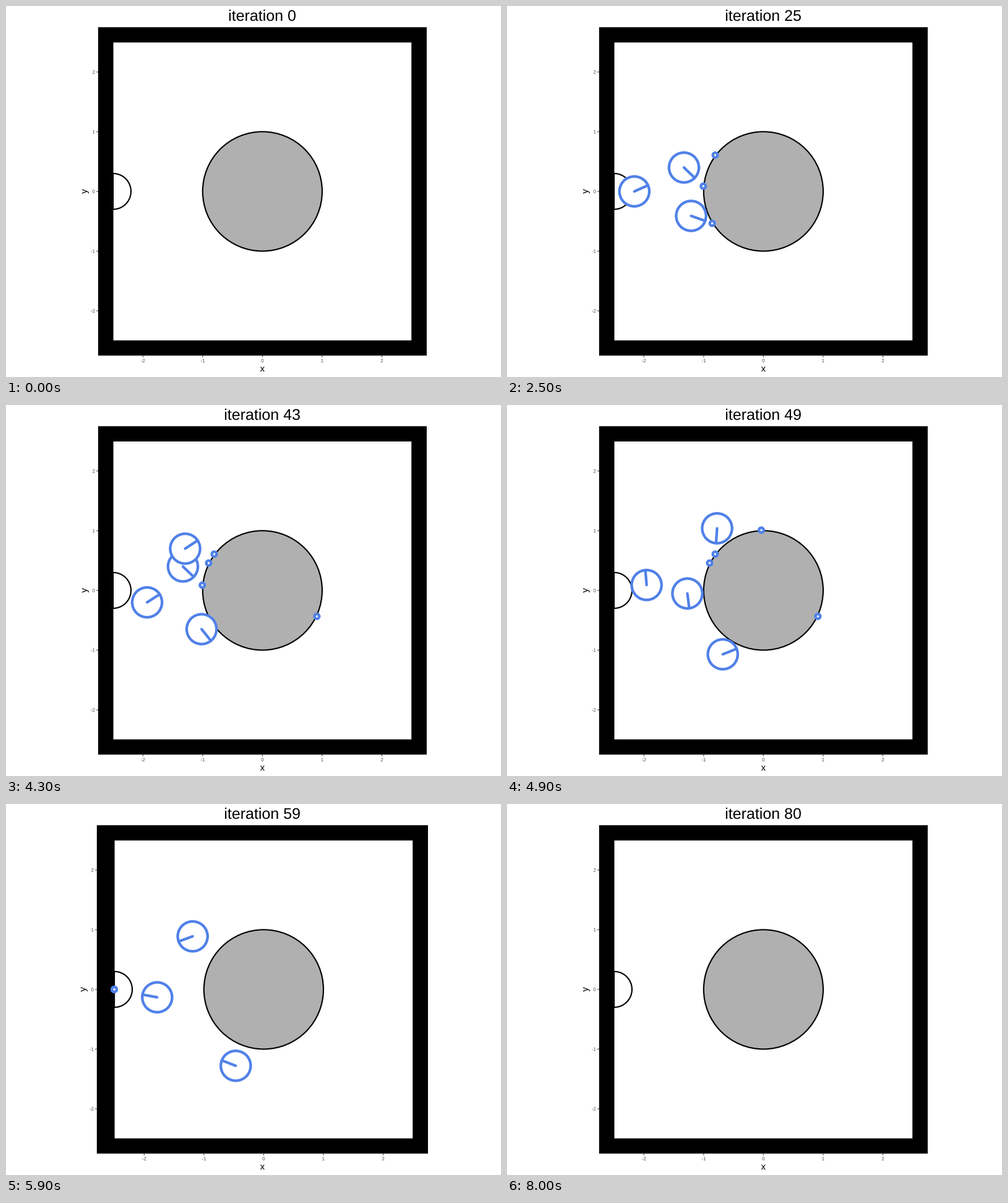
A matplotlib script for the animation above (8100 ms loop, 800x600 px).

```python
from itertools import pairwise

import numpy as np
import matplotlib.pyplot as plt
from matplotlib.animation import FuncAnimation
from matplotlib.patches import Circle, PathPatch, Polygon, Rectangle
from matplotlib.path import Path
from matplotlib.textpath import TextPath

plt.rcParams["font.family"] = "Liberation Sans"

FRAMES, INTERVAL = 81, 100
PX = 0.72                            # points per pixel at 100 dpi
TOP, BOTTOM = 34.3, 565.4            # panel edges in pixels
UNIT = (BOTTOM - TOP) / 5.5          # pixels per arena unit
CX, CY = 414.4, (TOP + BOTTOM) / 2
WALL, NEST, BODY, MARK = 2.5, 0.3, 0.25, 0.04
SPEED = 0.09                         # arena units per step
THIN, MEDIUM, THICK = 1.07, 2.13, 4.27
BLUE, GREY = "#5081e8", "#b0b0b0"
HOME = np.array([-WALL, 0.0])


def on_disc(degrees):
    a = np.radians(degrees)
    return 1.01 * np.array([np.cos(a), np.sin(a)])


def plan(stops, end):
    """Legs (depart, arrive, start, goal, mark) through the stops and back home.

    A stop is (arrival step, x, y, mark). Robots wait as long as SPEED allows.
    """
    last = np.array(stops[-1][1:3])
    door = HOME + (NEST + BODY) * (last - HOME) / np.hypot(*(last - HOME))
    legs = []
    for (t0, x0, y0, _), (t1, x1, y1, mark) in pairwise(stops + [(end, *door, HOME)]):
        start, goal = np.array([x0, y0]), np.array([x1, y1])
        depart = max(t0, t1 - np.hypot(*(goal - start)) / SPEED)
        legs.append((depart, t1, start, goal, mark))
    return stops[0][0], end, legs


ROBOTS = [
    plan([(1, -2.1, 0, None), (10, -1.33, -0.156, on_disc(197)),
          (22, -1.21, -0.41, on_disc(212)), (49, -0.68, -1.07, on_disc(-25.5)),
          (51, -0.18, -1.39, on_disc(-25.5)), (66, -1.055, -1.052, HOME)], end=80),
    plan([(13, -1.97, 0.07, None), (21, -1.33, 0.4, on_disc(175)),
          (51, -1.25, -0.23, on_disc(92))], end=61),
    plan([(25, -2.16, 0, None), (28, -2.04, -0.19, on_disc(143)),
          (37, -1.915, 0.29, on_disc(143)), (48, -0.775, 1.04, on_disc(143)),
          (66, -1.78, 0.672, HOME)], end=71),
    plan([(41, -1.93, -0.2, None), (51, -1.97, 0.27, on_disc(153))], end=54.4),
]


def pose(legs, step):
    """Position, unit heading and mark; a resting robot faces its mark."""
    started = [leg for leg in legs if leg[0] <= step]
    depart, arrive, start, goal, mark = (started or legs)[-1 if started else 0]
    pos = start + (goal - start) * np.clip((step - depart) / (arrive - depart), 0, 1)
    look = goal - start if depart < step <= arrive else mark - pos
    return pos, look / np.hypot(*look), mark


fig = plt.figure(figsize=(8, 6), dpi=100, facecolor="white")
ax = fig.add_axes([0, 0, 1, 1])


def pixels(point, shift):
    return np.array([CX + shift, CY]) + UNIT * np.asarray(point) * [1, -1]


def stroke(points, width, color, cap="butt"):
    ax.plot(*np.transpose(points), color=color, lw=width * PX,
            solid_capstyle=cap, snap=False)


def disc(center, radius, width, edge, fill):
    ax.add_patch(Circle(center, radius * UNIT, fc=fill, ec=edge, lw=width * PX))


def box(x0, y0, x1, y1, fill, width=0):
    ax.add_patch(Rectangle((x0, y0), x1 - x0, y1 - y0, fc=fill, ec="black",
                           lw=width * PX, snap=False))


def label(x, y, text, size, color="black", align=0.5, upright=False):
    """Text on a baseline through (x, y); align 0 is left, 1 is right."""
    path = TextPath((0, 0), text, size=size)
    ink = path.get_extents()
    u, v = path.vertices.T
    u = u - ink.x0 - align * ink.width
    points = (x - v, y - u) if upright else (x + u, y - v)
    ax.add_patch(PathPatch(Path(np.column_stack(points), path.codes),
                           fc=color, ec="none", snap=False))


def draw_arena(shift):
    half = (BOTTOM - TOP) / 2 + shift
    left, right = CX - half, CX + half
    box(left, TOP, right, BOTTOM, "black")
    box(*pixels((-WALL, WALL), shift), *pixels((WALL, -WALL), shift), "white", THIN)
    for v in range(-2, 3):
        x, y = pixels((v, v), shift)
        stroke([(x, BOTTOM), (x, BOTTOM + 2.75)], THIN, "#333333")
        stroke([(left - 2.75, y), (left, y)], THIN, "#333333")
        label(x, 576.3, f"{v}", 8, "#4d4d4d")
        label(left - 5.3, y + 2.87, f"{v}", 8, "#4d4d4d", align=1)
    label(CX, 591.3, "x", 15)
    label(130.8 - shift, CY, "y", 15, upright=True)

    disc(pixels((0, 0), shift), 1, MEDIUM, "black", GREY)
    a = np.linspace(-np.pi / 2, np.pi / 2, 80)
    arc = HOME + NEST * np.column_stack([np.cos(a), np.sin(a)])
    ax.add_patch(Polygon(pixels(arc, shift), fc="white", ec="black", lw=MEDIUM * PX))


def update(step):
    ax.clear()
    ax.set(xlim=(0, 800), ylim=(600, 0))
    ax.axis("off")
    poses = [pose(legs, step) for birth, end, legs in ROBOTS if birth <= step < end]
    # A mark on the wall widens the x range by its radius plus 5 % padding.
    wide = any(mark is HOME for _, _, mark in poses)
    shift = 1.05 * MARK * UNIT / 2 if wide else 0
    draw_arena(shift)
    for pos, look, _ in poses:
        disc(pixels(pos, shift), BODY, THICK, BLUE, "white")
        stroke(pixels([pos, pos + BODY * look], shift), THICK, BLUE, "round")
    for _, _, mark in poses:
        disc(pixels(mark, shift), MARK, THICK, BLUE, "white")
    label(CX, 24, f"iteration {step}", 25)
    return []


anim = FuncAnimation(fig, update, frames=FRAMES, interval=INTERVAL,
                     init_func=lambda: [], repeat=True, repeat_delay=0)
plt.show()
```
